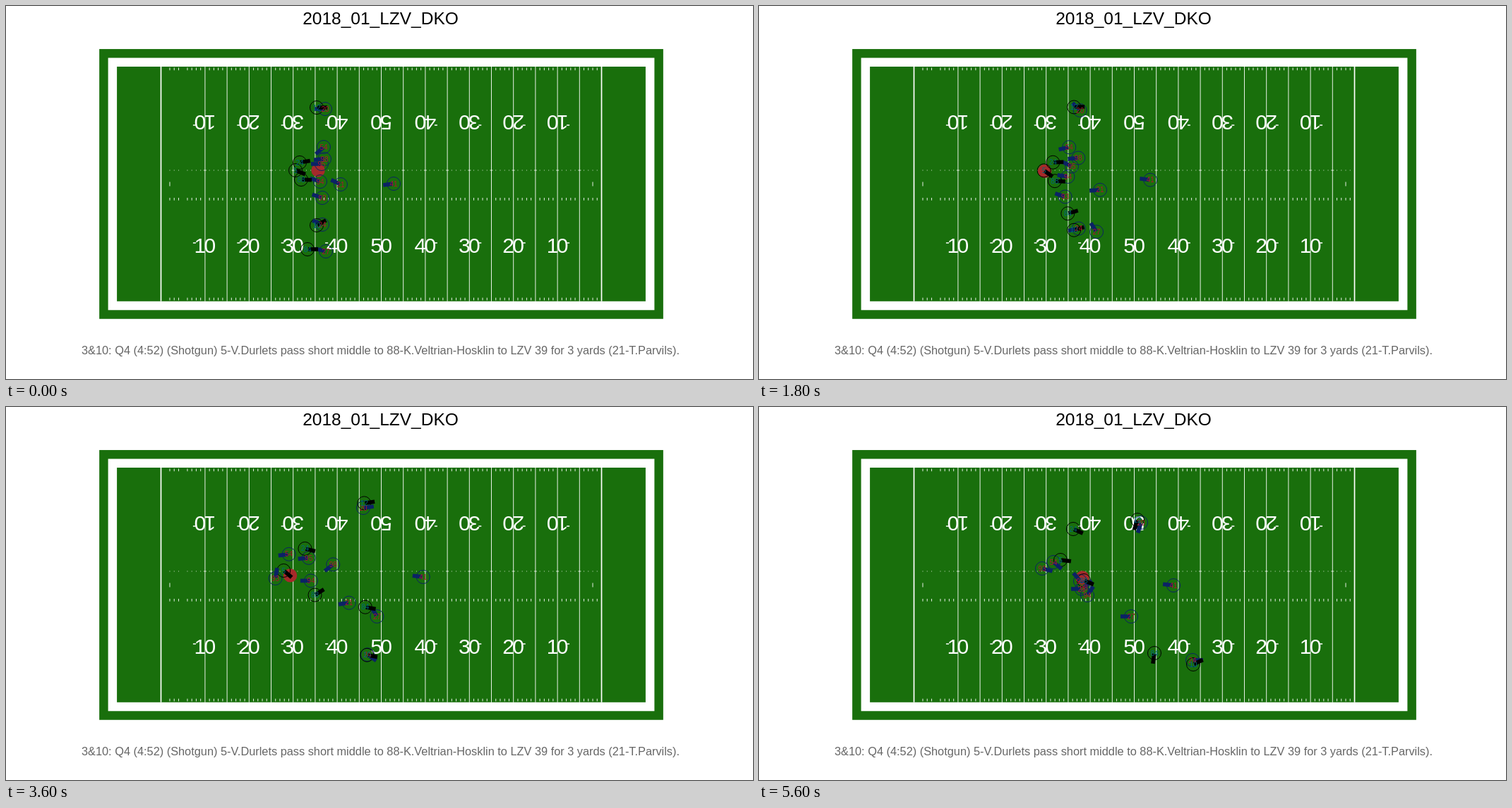
An HTML page for the animation above (5700 ms loop, 1058x529 px).

```html
<!DOCTYPE html>
<html lang="en">
<head>
<meta charset="utf-8">
<title>Play animation</title>
<style>
  html, body { margin: 0; width: 100%; height: 100%; overflow: hidden; background: #fff; }
  svg { display: block; width: 100vw; height: 100vh; }
  text { font-family: "Liberation Sans", Arial, sans-serif; text-anchor: middle; }
</style>
</head>
<body>
<svg id="stage" viewBox="0 0 1058 529"></svg>
<script>
(() => {
  const LOOP = 5700, STEP = 100;
  const YARD = 6.24, MID_X = 531.5, MID_Y = 252.4;
  const GRASS = '#196f0c';
  const stage = document.getElementById('stage');

  function add(parent, tag, attrs, content) {
    const el = document.createElementNS('http://www.w3.org/2000/svg', tag);
    for (const key in attrs) el.setAttribute(key, attrs[key]);
    if (content !== undefined) el.textContent = content;
    parent.appendChild(el);
    return el;
  }
  const line = (x1, y1, x2, y2, width = 1) =>
    add(stage, 'line', { x1, y1, x2, y2, stroke: '#fff', 'stroke-width': width });
  const yardX = yard => MID_X + (yard - 60) * YARD;

  // Field
  function slab(margin, fill) {
    const w = (120 + 2 * margin) * YARD, h = (53.33 + 2 * margin) * YARD;
    add(stage, 'rect', { x: MID_X - w / 2, y: MID_Y - h / 2, width: w, height: h, fill });
  }
  slab(4, GRASS);
  slab(2, '#fff');
  slab(0, GRASS);

  const far = 86, near = 418.8;
  for (const yard of [10, 110]) line(yardX(yard), far, yardX(yard), near, 1.7);
  for (let yard = 20; yard <= 105; yard += 5) {
    line(yardX(yard), far, yardX(yard), near, 0.9);
    line(yardX(yard) - 2, 233, yardX(yard) + 2, 233, 0.8);
  }
  for (let yard = 12; yard < 110; yard++) {
    if (yard % 5 === 0) continue;
    const x = yardX(yard);
    for (const y of [87.5, 272, 413.7]) line(x, y, x, y + 3.7, 0.9);
    line(x, 232.5, x, 233.5, 0.8);
  }
  for (const yard of [12, 108]) line(yardX(yard), 249.5, yardX(yard), 255.5, 0.9);

  function yardNumber(x, digits, side, flip) {
    const g = add(stage, 'g', {
      transform: `translate(${x} ${flip ? 166 : 339}) rotate(${flip ? 180 : 0})`,
      fill: '#fff', 'font-size': 30
    });
    [...digits].forEach((d, i) => add(g, 'text', { x: i ? 7 : -7, y: 10.8 }, d));
    const y = flip ? 169 : 336;
    if (side) line(x + side * 13, y, x + side * 17, y, 1.5);
  }
  for (let yard = 20; yard <= 100; yard += 10) {
    const label = String(50 - Math.abs(yard - 60));
    for (const flip of [true, false]) yardNumber(yardX(yard), label, Math.sign(yard - 60), flip);
  }

  add(stage, 'text', { x: 530.5, y: 26.4, 'font-size': 24.5, fill: '#000' }, '2018_01_LZV_DKO');
  add(stage, 'text', { x: 530.5, y: 494.3, 'font-size': 16.33, fill: '#666' },
    '3&10: Q4 (4:52) (Shotgun) 5-V.Durlets pass short middle to 88-K.Veltrian-Hosklin ' +
    'to LZV 39 for 3 yards (21-T.Parvils).');

  // Motion
  const SNAP = 1200;
  const ROUTE_TIMES = [SNAP, 2400, 3100, 4000, 4800, 5600];
  const progress = (t, start, end) => Math.min(1, Math.max(0, (t - start) / (end - start)));
  const mix = (a, b, u) => a + (b - a) * u;

  // Eased rotation by some degrees between two times
  function turn(t, start, end, degrees) {
    const u = progress(t, start, end);
    return degrees * u * u * (3 - 2 * u);
  }

  // Monotone cubic through a route, starting from rest
  function along(route, axis, time) {
    const last = route.length - 1;
    let i = 0;
    while (i < last - 1 && time > route[i + 1].t) i++;
    const slope = k => (route[k + 1][axis] - route[k][axis]) / (route[k + 1].t - route[k].t);
    const tangent = k => {
      if (k === 0) return 0;
      if (k === last) return slope(last - 1);
      const a = slope(k - 1), b = slope(k);
      return a * b <= 0 ? 0 : 2 * a * b / (a + b);
    };
    const from = route[i], to = route[i + 1];
    const u = progress(time, from.t, to.t), v = 1 - u;
    return from[axis] * v * v * (1 + 2 * u) + to[axis] * u * u * (3 - 2 * u) +
      (to.t - from.t) * u * v * (tangent(i) * v - tangent(i + 1) * u);
  }

  const ball = add(stage, 'circle', { r: 9.7, fill: '#a52a2a' });
  const [rings, bars, labels] = [0, 1, 2].map(() => add(stage, 'g', {}));
  const offense = { ink: '#000', label: '#006778' };
  const defense = { ink: '#0b2265', label: '#a71930' };
  const players = [];

  // Points before the snap come as `lead`; the others follow ROUTE_TIMES
  function player(team, number, points, heading, lead = []) {
    const route = points.split(' ').map((point, i) => {
      const [x, y] = point.split(',').map(Number);
      return { t: ROUTE_TIMES[i], x, y };
    });
    const p = {
      route: [...lead, ...route],
      heading,
      ring: add(rings, 'circle', { r: 9.5, fill: 'none', stroke: team.ink, 'stroke-width': 1 }),
      bar: add(bars, 'rect', { x: 1, y: -2.8, width: 14, height: 5.6, fill: team.ink }),
      label: add(labels, 'text', { y: 3.6, 'font-size': 10, fill: team.label }, number)
    };
    players.push(p);
    return p;
  }

  player(defense, 20, '452,146 461,150 485,143 521,143 540,149 541,164',
    t => 180 + turn(t, 1200, 3000, 172) + turn(t, 4000, 5600, 115));
  player(defense, 54, '450,200 421,201 403,205 400,212 407,218 417,220',
    t => 138 + turn(t, 0, 2400, 35) + turn(t, 4800, 5600, -133));
  player(defense, 98, '451,217 455,214 459,216 466,232 468,252 460,256',
    t => 175 + turn(t, 2400, 4000, -40) + turn(t, 4800, 5600, 185));
  player(defense, 95, '447,224 436,231 428,217 430,213 446,226 455,247',
    t => 180 + turn(t, 0, 2400, 30) + turn(t, 3100, 4800, -170) + turn(t, 4800, 5600, -170));
  player(defense, 94, '445,249 430,235 430,239 435,254 448,269 465,267',
    t => 198 + turn(t, 1200, 2400, -18) + turn(t, 4000, 5200, -235));
  player(defense, 93, '448,272 410,267 389,256 379,233 389,221 401,229',
    t => 198 + turn(t, 1800, 5600, 177));
  player(defense, 21, '481,259 485,263 488,272 482,280 460,257 457,258',
    t => 205 + turn(t, 0, 3000, -45) + turn(t, 3100, 4000, 20), [{ t: 0, x: 474, y: 253 }]);
  player(defense, 27, '467,329 490,313 509,304 535,294 541,298 527,297',
    t => 195 + turn(t, 0, 3000, 65) + turn(t, 3100, 4600, -80), [{ t: 500, x: 453, y: 348 }]);
  player(defense, 41, '551,249 560,244 576,241 599,241 603,249 587,253',
    t => 172 + turn(t, 0, 1200, 15), [{ t: 0, x: 549, y: 252 }]);
  player(defense, 24, '448,310 463,326 488,340 533,356 575,355 614,359',
    t => 203 + turn(t, 1300, 3000, -168) + turn(t, 4800, 5600, -35));

  player(offense, 12, '440,144 459,142 485,136 522,137 537,146 536,160',
    t => turn(t, 1200, 3100, -8) + turn(t, 4000, 5400, 116));
  player(offense, 84, '428,311 455,283 485,280 526,290 550,317 560,349',
    t => turn(t, 0, 1200, -32) + turn(t, 1200, 2400, 32) + turn(t, 3300, 4800, 98),
    [{ t: 0, x: 427, y: 345 }]);
  player(offense, 10, '440,311 459,330 487,345 532,356 575,362 615,365',
    t => -28 + turn(t, 1300, 3000, 57) + turn(t, 3100, 4800, -91) + turn(t, 4800, 5600, 37));
  player(offense, 24, '416,222 417,221 420,212 427,191 438,174 445,173',
    t => turn(t, 0, 5600, 34) - 10);
  const receiver = player(offense, 88, '418,246 421,253 428,265 446,267 460,260 460,246',
    t => 3 + turn(t, 2400, 3100, -35) + turn(t, 3700, 4800, 54));
  const passer = player(offense, 5, '410,233 394,234 388,236 400,227 412,219 427,217',
    t => 22 + turn(t, 1200, 3000, 52) + turn(t, 3200, 4000, -67));

  // Snapped to the passer, carried, thrown, then carried by the receiver
  function ballAt(axis, time) {
    const spot = { x: 442, y: 233 }[axis];
    const held = along(passer.route, axis, time) + { x: 1, y: 1 }[axis];
    const caught = along(receiver.route, axis, time) - { x: 2, y: 4 }[axis];
    return mix(mix(spot, held, progress(time, 1050, 1500)), caught, progress(time, 3500, 4000));
  }

  const translate = (x, y) => `translate(${x.toFixed(2)} ${y.toFixed(2)})`;

  function draw(time) {
    ball.setAttribute('transform', translate(ballAt('x', time), ballAt('y', time)));
    for (const { route, heading, ring, bar, label } of players) {
      const place = translate(along(route, 'x', time), along(route, 'y', time));
      ring.setAttribute('transform', place);
      label.setAttribute('transform', place);
      bar.setAttribute('transform', `${place} rotate(${heading(time).toFixed(1)})`);
    }
  }

  const start = performance.now();
  function tick() {
    const elapsed = (performance.now() - start) % LOOP;
    draw(Math.floor(elapsed / STEP) * STEP);
    requestAnimationFrame(tick);
  }
  tick();
})();
</script>
</body>
</html>
```
